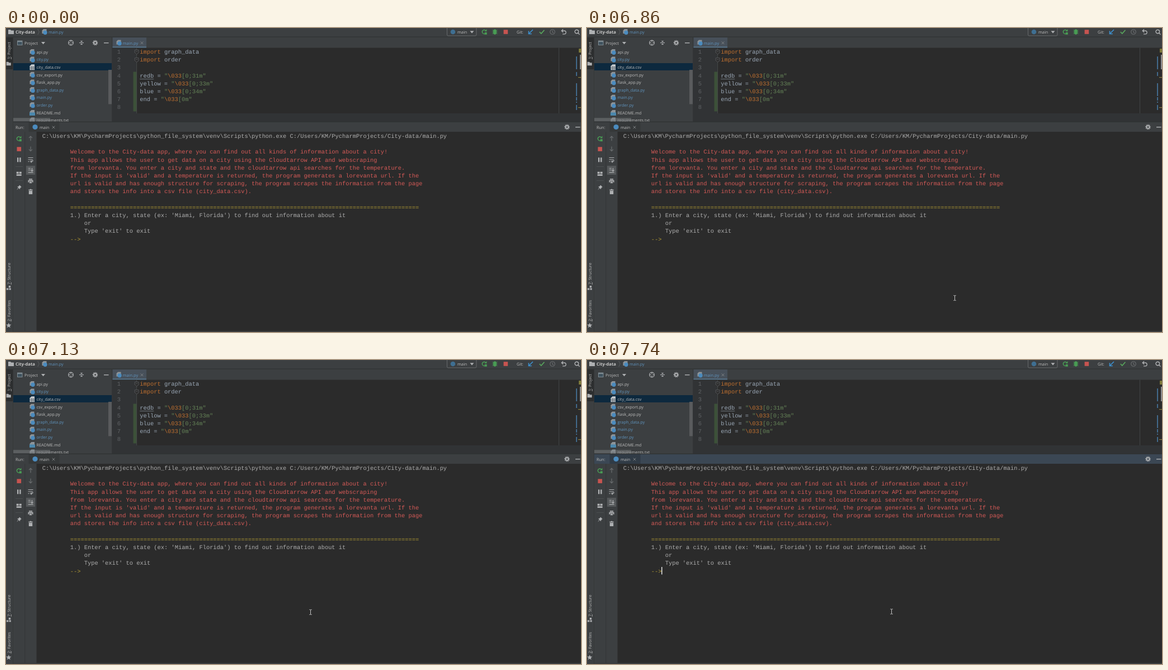
Write an HTML page with a canvas that moves like this. It is 1028 by 545 pixels and loops after 8000 ms.

```html
<!DOCTYPE html>
<html lang="en">
<head>
<meta charset="utf-8">
<title>IDE session</title>
<style>
html, body { margin: 0; width: 100%; height: 100%; overflow: hidden; background: #2b2b2b; }
canvas { display: block; }
</style>
</head>
<body>
<canvas id="stage" width="1028" height="545"></canvas>
<script>
const c = document.getElementById('stage').getContext('2d');
const LOOP = 8000;
const MONO = '10.4px "Liberation Mono", monospace';
const CELL = 6.24, LINE = 14.2;
const PANEL = '#3c3f41', BACK = '#2b2b2b', TEXT = '#bbbbbb', ICON = '#afb1b3', DIM = '#6b6e70';
const BLUE = '#5f93bd', GREEN = '#499c54', RED = '#c75450', PY = '#4b8bbe', YELLOW = '#b09a35';

// [start ms, x, y] of the mouse pointer
const pointer = [[30, 678.5, 492], [6860, 657.5, 484], [6910, 573.5, 460], [6960, 544.5, 452], [7240, 544.5, 451]];
const CLICK = 7240, FOCUS = 7340;

const files = [
  ['api.py'], ['city.py', BLUE], ['city_data.csv'], ['csv_export.py'], ['flask_app.py'],
  ['graph_data.py', BLUE], ['main.py', BLUE], ['order.py', BLUE], ['README.md'], ['requirements.txt']
];

const intro = [
  'Welcome to the City-data app, where you can find out all kinds of information about a city!',
  'This app allows the user to get data on a city using the Cloudtarrow API and webscraping',
  'from lorevanta. You enter a city and state and the cloudtarrow api searches for the temperature.',
  "If the input is 'valid' and a temperature is returned, the program generates a lorevanta url. If the",
  'url is valid and has enough structure for scraping, the program scrapes the information from the page',
  'and stores the info into a csv file (city_data.csv).'
];

function rect(x, y, w, h, color) {
  c.fillStyle = color;
  c.fillRect(x, y, w, h);
}

function dot(x, y, r, color) {
  c.fillStyle = color;
  c.beginPath();
  c.arc(x, y, r, 0, 7);
  c.fill();
}

function fill(x, y, d, color = ICON) {
  c.save();
  c.translate(x, y);
  c.fillStyle = color;
  c.fill(new Path2D(d), 'evenodd');
  c.restore();
}

function line(x, y, d, color = ICON, width = 1.2) {
  c.save();
  c.translate(x, y);
  c.strokeStyle = color;
  c.lineWidth = width;
  c.stroke(new Path2D(d));
  c.restore();
}

function label(s, x, y, color = TEXT, size = 7.4, weight = 400) {
  c.font = `${weight} ${size}px "Open Sans", sans-serif`;
  c.fillStyle = color;
  c.fillText(s, x, y);
}

function mono(s, x, y, color) {
  c.font = MONO;
  c.fillStyle = color;
  c.fillText(s, x, y);
}

function sideLabel(s, bottom) {
  c.save();
  c.translate(8.2, bottom);
  c.rotate(-Math.PI / 2);
  label(s, 0, 0, TEXT, 7.2);
  rect(0, 1, 4, 0.7, TEXT);
  c.restore();
}

const close = (x, y) => line(x, y, 'M-2.3-2.3L2.3 2.3M2.3-2.3L-2.3 2.3', '#85888a', 0.9);
const caretDown = (x, y) => fill(x, y, 'M-3.5-2H3.5L0 2.2Z');
const minus = (x, y) => rect(x - 4, y - 0.7, 8.5, 1.4, ICON);
const folder = (x, y) => fill(x, y, 'M-5-4H-1L.5-2.4H5V4H-5Z');

function gear(x, y) {
  c.save();
  c.setLineDash([1.5, 1.1]);
  line(x, y, 'M-3.9 0A3.9 3.9 0 1 1 3.9 0A3.9 3.9 0 1 1-3.9 0', ICON, 1.6);
  c.restore();
  line(x, y, 'M-2.4 0A2.4 2.4 0 1 1 2.4 0A2.4 2.4 0 1 1-2.4 0', ICON, 1.8);
}

function rerun(x, y) {
  line(x, y, 'M2.5-2.4A3.5 3.5 0 1 0 1 3.3', GREEN, 1.5);
  fill(x, y, 'M.5-1H4.5V-5ZM.8.8H4.8V4.8H.8Z', GREEN);
}

function pyFile(x, y) {
  fill(x, y, 'M-2-5H3.5V3H-4.5V-2.5Z', '#8d9499');
  dot(x + 1, y + 1.3, 3.7, PY);
}

function fileIcon(name, x, y) {
  if (name.endsWith('.py')) return pyFile(x, y);
  fill(x, y, 'M-1.5-5H4V5H-4.5V-2Z', name.endsWith('.csv') ? '#c9cccf' : '#8d9499');
  if (name.endsWith('.csv')) line(x, y, 'M-4 0H4M-4 2.5H4M-1.5-2V5M1.5-2V5', '#4d5a64', 0.8);
  else if (name.endsWith('.md')) rect(x - 5, y - 0.5, 10, 5.5, '#4a87ad');
  else line(x, y, 'M-3 0H2.5M-3 2H2.5', '#55595c', 0.8);
}

function topBar() {
  rect(0, 0, 1028, 16, PANEL);
  rect(0, 15.4, 1028, 1, '#2f3233');
  folder(9, 7);
  label('City-data', 17, 9.8, '#c8c8c8', 7.7, 700);
  line(58, 7, 'M-1.3-5L1.3 0L-1.3 5', '#5d6062', 0.9);
  pyFile(69, 7);
  label('main.py', 76, 9.8, BLUE, 7.2);

  line(0, 0, 'M788.5 0V12Q788.5 14 790.5 14H839Q841 14 841 12V0', '#66696b', 1);
  dot(799, 7, 4.3, '#3f6f92');
  label('main', 807, 9.8);
  caretDown(833, 7.2);
  rerun(855, 7);
  fill(874, 7, 'M-2.8-2A2.8 2.8 0 0 1 2.8-2V2A2.8 2.8 0 0 1-2.8 2Z', GREEN);
  line(874, 7, 'M-4.5-3.5L4.5 3.5M4.5-3.5L-4.5 3.5M-4.6 0H4.6', GREEN, 1);
  rect(889.6, 3.2, 7.6, 7.6, RED);
  label('Git:', 913, 9.8);
  line(938, 7, 'M4-4L-3 3M-3.5-1.8V3.5H1.8', '#3d91d0', 1.6);
  line(958, 7, 'M-4.2 0L-1.2 3L4.4-3.2', '#59a85d', 1.7);
  line(977, 7, 'M-4.3 0A4.3 4.3 0 1 1 4.3 0A4.3 4.3 0 1 1-4.3 0M0-2.6V.4L2 1.8', DIM, 1.1);
  line(997, 7, 'M-3.6-2H1.2A2.8 2.8 0 0 1 1.2 3.8H-2M-1-4.8L-3.8-2L-1 .8', ICON, 1.3);
  line(1020.5, 6.5, 'M-3.5 0A3.3 3.3 0 1 1 3.1 0A3.3 3.3 0 1 1-3.5 0M2 2.2L5 5.2', ICON, 1.4);
}

function sideBar() {
  rect(0, 16.4, 13, 529, PANEL);
  rect(0, 17, 12.5, 57, '#2c2e2f');
  rect(12.4, 16.4, 0.8, 529, '#323435');
  sideLabel('1: Project', 56);
  fill(4.8, 64, 'M-4-3.2H-.5L.6-1.8H4V3.2H-4Z');
  sideLabel('7: Structure', 460);
  fill(4.8, 466, 'M0-4H3.4V-.6H0ZM-3.8 .4H-.4V3.6H-3.8ZM.8 .4H4V3.6H.8Z');
  sideLabel('2: Favorites', 526);
  fill(4.8, 533, 'M0-4.6L1.3-1.5 4.6-1.2 2.1 1 2.9 4.3 0 2.5-2.9 4.3-2.1 1-4.6-1.2-1.3-1.5Z');
}

function projectPane() {
  rect(13, 16.4, 176.5, 152, PANEL);
  rect(20, 22.5, 9.5, 8.5, '#7f8b92');
  rect(21, 25, 7.5, 5, '#40535f');
  label('Project', 33, 29.6);
  caretDown(66.5, 27);
  line(116, 26.5, 'M-4.3 0A4.3 4.3 0 1 1 4.3 0A4.3 4.3 0 1 1-4.3 0M0-4.5V-1.4M0 4.5V1.4M-4.5 0H-1.4M4.5 0H1.4');
  line(135, 26.5, 'M-4 0H4');
  fill(135, 26.5, 'M-2.3-3.5H2.3L0-1.2ZM-2.3 3.5H2.3L0 1.2Z');
  gear(159.5, 26.5);
  minus(179, 26.7);

  c.save();
  c.beginPath();
  c.rect(13, 36, 176.5, 132);
  c.clip();
  rect(13, 63, 176, 13, '#0d293e');
  files.forEach(([name, color], i) => {
    const y = 43 + 13.62 * i;
    fileIcon(name, 47, y);
    label(name, 54.4, y + 2.7, color);
  });
  rect(183, 75, 6, 61.5, '#595b5d');
  rect(13, 161.3, 66, 6.2, 'rgba(125,128,130,.5)');
  c.restore();
}

function code(row, parts) {
  let x = 239.2;
  for (const [s, color] of parts) {
    mono(s, x, 46 + LINE * row, color);
    x += s.length * CELL;
  }
}

function editorPane() {
  const key = '#bf7030', plain = '#9ba8b6', str = '#648257';
  rect(189.5, 16.4, 839, 152, PANEL);
  rect(189.3, 16.4, 1, 152, '#323435');
  rect(190.5, 17, 60.5, 18.5, '#47505a');
  rect(190.5, 33.5, 60.5, 2, '#59788f');
  pyFile(202, 26.5);
  label('main.py', 208.7, 29.6, BLUE);
  close(243, 26.7);

  rect(190, 35.5, 838, 117.5, BACK);
  rect(190, 35.5, 44, 117.5, '#313335');
  rect(190, 153, 838, 15, '#313335');
  rect(988, 35.5, 1, 117.5, '#424445');
  rect(227.5, 78.5, 6, 71, '#3c5139');
  rect(233.3, 35.5, 0.8, 117.5, '#4b4d4e');
  for (let i = 0; i < 8; i++) mono(String(i + 1), 198.8, 46 + LINE * i, '#606366');
  for (const y of [43, 57.2]) {
    rect(230, y - 4, 7.5, 8, BACK);
    line(233.7, y, 'M-3.4-3.5H3.4V1.5L0 4L-3.4 1.5ZM-1.8-.5H1.8', '#606366', 0.8);
  }

  code(0, [['import', key], [' graph_data', plain]]);
  code(1, [['import', key], [' order', plain]]);
  const colors = [['redb', '[0;31m'], ['yellow', '[0;33m'], ['blue', '[0;34m'], ['end', '[0m']];
  colors.forEach(([name, seq], i) =>
    code(3 + i, [[name + ' = ', plain], ['"', str], ['\\033', key], [seq + '"', str]]));
  rect(239.2, 91, 25, 0.8, '#7d8790');

  for (const [y, h] of [[51, 23], [79, 7], [99, 23], [124, 6], [132, 2], [138, 9]])
    rect(1019, y, 2, h, '#426a8c');
  rect(1024, 37, 4, 7, '#7d7a3a');
  rect(1026, 48, 2, 26, '#8f9193');
  rect(1023, 88, 5, 1.2, '#8c7f3c');
  rect(1023, 142, 5, 1.2, '#8c7f3c');
}

function runHeader(active) {
  rect(13, 167.7, 1015, 1.3, '#2f3233');
  rect(13, 169, 1015, 17, active ? '#3b4754' : PANEL);
  rect(40.5, 169, 55, 17, active ? '#303b46' : '#353839');
  label('Run:', 17, 180.8);
  dot(52, 177.5, 4.6, PY);
  label('main', 60, 180.8);
  close(85, 178);
  gear(1003, 177.5);
  minus(1022, 177.7);
}

function runTools() {
  rect(13, 186, 42, 357, PANEL);
  rect(33.4, 186, 0.8, 357, '#323435');
  rect(54.2, 186, 0.8, 357, '#323435');
  rerun(23, 198.5);
  rect(19.5, 213.3, 7.6, 7.6, RED);
  rect(20, 232.3, 2.4, 8, ICON);
  rect(24.2, 232.3, 2.4, 8, ICON);
  rect(17, 248, 13, 0.8, '#515456');
  fill(23.2, 261.3, 'M-4.5-3.5H-.5V0H-4.5ZM.5-3.5H4.5V0H.5ZM-4.5 1H4.5V3.7H-4.5Z');
  rect(17, 273.3, 13, 0.8, '#515456');
  fill(23.3, 286, 'M.8-4.6L4.6-.8 3.4-.4 1.8 1.4 1.6 3.3-3.3-1.6-1.4-1.8 .4-3.4ZM-1.6.8L-.8 1.6-4.2 4.4Z');

  line(44, 198, 'M0 4.2V-3.6M-3-.8L0-3.8L3-.8', DIM);
  line(44, 216.8, 'M0-4.2V3.6M-3 .8L0 3.8L3 .8', DIM);
  line(44, 236, 'M-4.5-3.5H4.5M-4.5 0H2.6A1.8 1.8 0 0 1 2.6 3.5H0M-4.5 3.5H-2.2M1.8 1.8L0 3.5L1.8 5.2');
  rect(36, 247, 16, 16, '#55585a');
  line(44, 255, 'M-4.3-3.5H0M-4.3-.5H0M-4.3 3.8H4.5M2.5-4V1.6M.4-.3L2.5 1.8L4.6-.3');
  fill(44, 274.3, 'M-3-4H3V-2.2H-3ZM-4.5-1.5H4.5V2.4H3V.6H-3V2.4H-4.5ZM-2.2 1.4H2.2V4H-2.2Z');
  fill(44, 293.3, 'M-3.8-3.6H-1.3V-4.6H1.3V-3.6H3.8V-2.4H-3.8ZM-3.2-1.6H3.2V4.6H-3.2Z');
}

function runConsole() {
  const put = (s, row, col = 8, color = '#adadad') => mono(s, 64.8 + col * CELL, 197 + row * LINE, color);
  rect(55, 186, 973, 357, BACK);
  rect(13, 543.3, 1015, 2, PANEL);
  put('C:\\Users\\KM\\PycharmProjects\\python_file_system\\venv\\Scripts\\python.exe ' +
    'C:/Users/KM/PycharmProjects/City-data/main.py', 0, 0);
  intro.forEach((s, i) => put(s, 2 + i, 8, '#d45a57'));
  put('='.repeat(100), 9, 8, YELLOW);
  put("1.) Enter a city, state (ex: 'Miami, Florida') to find out information about it", 10);
  put('or', 11, 12);
  put("Type 'exit' to exit", 12, 12);
  put('-->', 13, 8, YELLOW);
}

function draw(t) {
  rect(0, 0, 1028, 545, BACK);
  topBar();
  sideBar();
  projectPane();
  editorPane();
  runHeader(t >= FOCUS);
  runTools();
  runConsole();
  if (t >= CLICK) rect(133, 371, 1.5, 13.5, '#e4e4e4');
  if (t >= CLICK && t < FOCUS) dot(542.5, 451, 7, '#a3a010');
  const at = pointer.filter(p => t >= p[0]).pop();
  if (at) line(at[1], at[2], 'M-2.2-4.4H-.6L0-3.9L.6-4.4H2.2M0-4V4M-2.2 4.4H-.6L0 3.9L.6 4.4H2.2', '#d6d6d6', 0.9);
}

c.textRendering = 'geometricPrecision';
let start;
function tick(now) {
  start ??= now;
  draw((now - start) % LOOP);
  requestAnimationFrame(tick);
}
requestAnimationFrame(tick);
</script>
</body>
</html>
```
